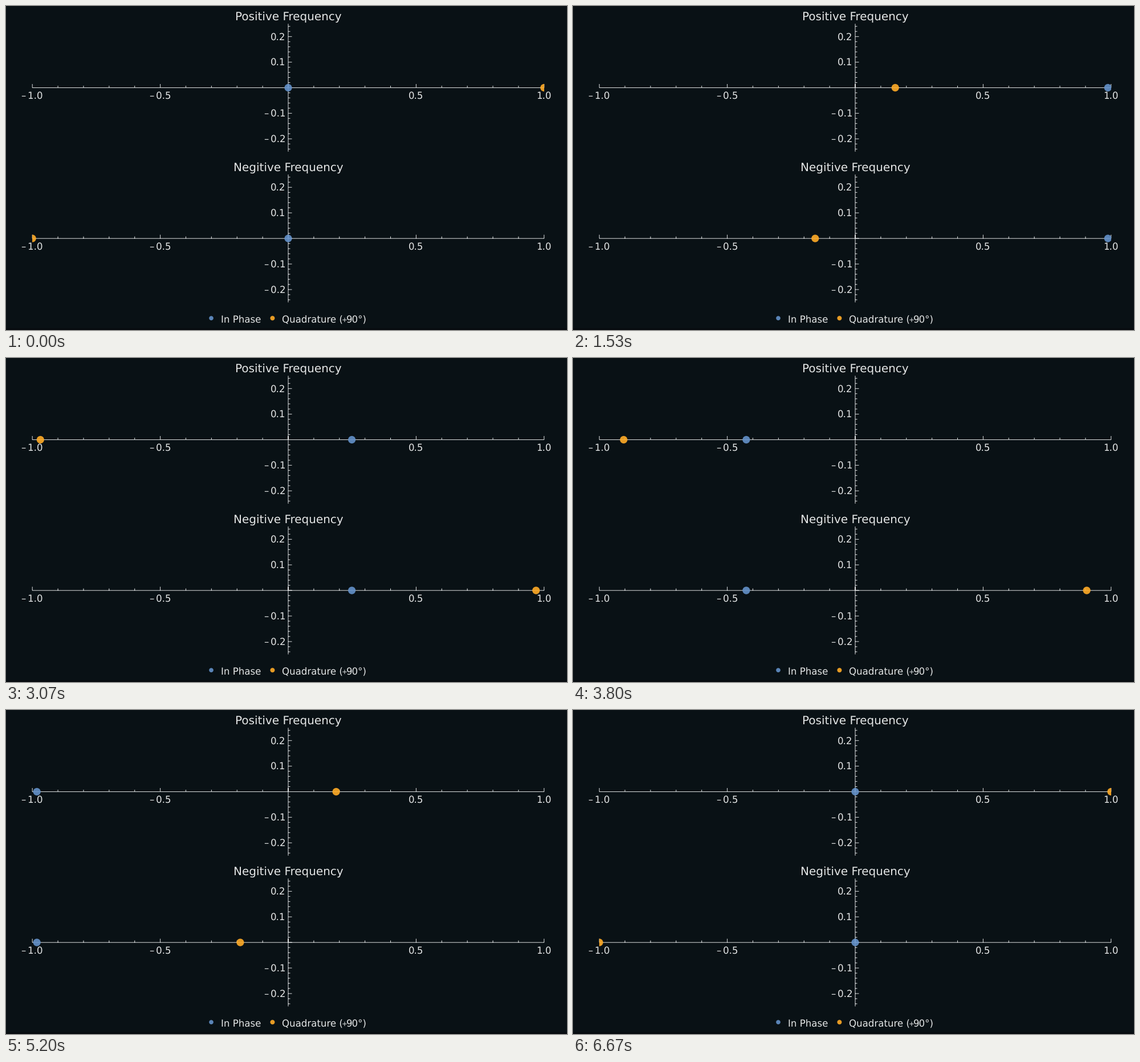
A matplotlib script for the animation above (6700 ms loop, 984x569 px).

```python
import numpy as np
import matplotlib.pyplot as plt
from matplotlib.animation import FuncAnimation
from matplotlib.patches import Circle, Rectangle

W, H, DPI = 984, 569, 100
FRAMES, LOOP = 201, 6700
BG, INK, LINE = "#091115", "#e4e6e6", "#dcdedf"
BLUE, ORANGE = "#6492ca", "#ffab26"
CX, HALF_W = 495.0, 448.8      # x = 0 and the length of one unit
TOP_Y, STEP_Y = 143.5, 264.7   # y = 0 of the first panel, panel spacing
UNIT_Y, Y_MAX = 449, 0.25
TICK_PT, TITLE_PT = 12, 14.4

plt.rcParams.update({"font.family": "DejaVu Sans", "text.hinting": "none"})
fig = plt.figure(figsize=(W / DPI, H / DPI), dpi=DPI, facecolor=BG)
ax = fig.add_axes([0, 0, 1, 1])
ax.set(xlim=(0, W), ylim=(H, 0))
ax.axis("off")
ax.add_patch(Rectangle((0, 566), W, 3, color="#070b0f", lw=0))


def label(x, y, s, size=TICK_PT, ha="center"):
    ax.text(x, y, s, size=size, ha=ha, va="baseline", color=INK)


def number(v):
    """One decimal, with a short dash and a narrow space as the minus."""
    return f"{v:.1f}".replace("-", "\u2013\u2006")


def draw_axes(y0, title):
    xs, ys = [], []

    def seg(x1, y1, x2, y2):
        xs.extend((x1, x2, np.nan))
        ys.extend((y1, y2, np.nan))

    reach = UNIT_Y * Y_MAX
    seg(CX - HALF_W, y0, CX + HALF_W, y0)
    seg(CX, y0 - reach, CX, y0 + reach)

    for k in range(-10, 11):
        x = CX + HALF_W * k / 10
        seg(x, y0, x, y0 - (6.5 if k % 5 == 0 else 3.5))
        if k and k % 5 == 0:
            label(x, y0 + 19.2, number(k / 10))

    for k in range(-12, 13):
        y = y0 - UNIT_Y * k / 50
        seg(CX, y, CX + (6.5 if k % 5 == 0 else 3.5), y)
        if k and k % 5 == 0:
            label(490.5, y + 5.6, number(k / 50), ha="right")

    ax.plot(xs, ys, color=LINE, lw=72 / DPI, solid_capstyle="butt",
            snap=False, zorder=2)
    label(CX, y0 - 118.2, title, TITLE_PT)


def dot(x, y, r, color):
    return ax.add_patch(Circle((x, y), r, fc=color, lw=0, alpha=0.9, zorder=3))


def draw_panel(y0, title):
    draw_axes(y0, title)
    reach = UNIT_Y * Y_MAX
    frame = Rectangle((CX - HALF_W, y0 - reach), 2 * HALF_W, 2 * reach,
                      transform=ax.transData)
    dots = [dot(CX, y0, 6.6, c) for c in (BLUE, ORANGE)]
    for d in dots:
        d.set_clip_path(frame)
    return dots


panels = [draw_panel(TOP_Y, "Positive Frequency"),
          draw_panel(TOP_Y + STEP_Y, "Negitive Frequency")]

dot(360, 548.2, 3.8, BLUE)
dot(467.4, 548.2, 4, ORANGE)
label(376.8, 557, "In Phase", ha="left")
label(484, 557, "Quadrature (", ha="left")
label(593.8, 555, "+", 8.6)
label(633.4, 557, "90\u00b0)", ha="right")


def update(i):
    a = 2 * np.pi * i / (FRAMES - 1)
    for (phase, quad), sign in zip(panels, (1, -1)):
        phase.center = CX + HALF_W * np.sin(a), phase.center[1]
        quad.center = CX + sign * HALF_W * np.cos(a), quad.center[1]
    return [d for pair in panels for d in pair]


anim = FuncAnimation(fig, update, frames=FRAMES, interval=LOOP / FRAMES,
                     repeat=True, repeat_delay=0, blit=False)
plt.show()
```
